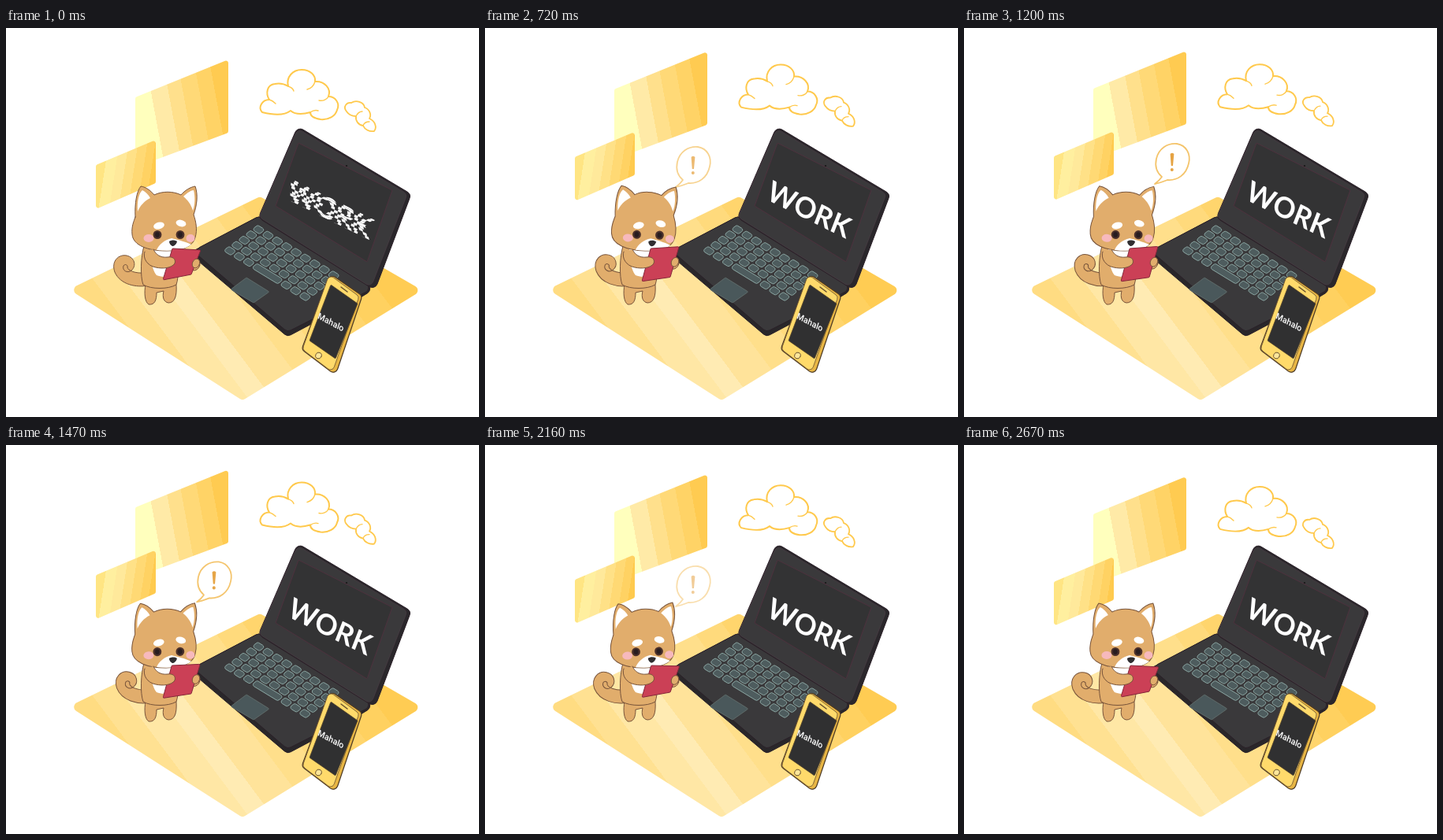
An HTML page with a canvas that plays this animation: 600 by 494 pixels, repeating every 2700 ms.

```html
<!DOCTYPE html>
<html lang="en">
<head>
<meta charset="utf-8">
<title>Work</title>
<style>
  html, body { margin: 0; width: 100%; height: 100%; overflow: hidden; background: #fff; }
  canvas { display: block; width: 600px; height: 494px; }
</style>
</head>
<body>
<canvas id="stage" width="600" height="494"></canvas>
<script>
const ctx = document.getElementById('stage').getContext('2d');
const LOOP = 2700, STEP = 30;
const INK = '#302e31', FUR = '#e1ad6c', LINE = '#77533a', GOLD = '#ffc94c';

// Piecewise linear value through [time, value] pairs.
function track(t, keys) {
  for (let i = 1; i < keys.length; i++) {
    const [t0, v0] = keys[i - 1], [t1, v1] = keys[i];
    if (t <= t1) return v0 + (v1 - v0) * (t - t0) / (t1 - t0);
  }
  return keys[keys.length - 1][1];
}

const noise = n => {
  const s = Math.sin(n * 127.1 + 11.7) * 43758.5453;
  return (s - Math.floor(s)) * 2 - 1;
};

function paint(path, fill, stroke, width = 1) {
  if (fill) { ctx.fillStyle = fill; ctx.fill(path); }
  if (stroke) { ctx.strokeStyle = stroke; ctx.lineWidth = width; ctx.stroke(path); }
}

const shape = (d, fill, stroke, width) => paint(new Path2D(d), fill, stroke, width);

function oval(x, y, rx, ry, fill, stroke, turn = 0, width = 1) {
  const p = new Path2D();
  p.ellipse(x, y, rx, ry, turn, 0, Math.PI * 2);
  paint(p, fill, stroke, width);
}

// Closed polygon with rounded corners.
function poly(points, radius = 0) {
  const p = new Path2D(), n = points.length;
  const [a, b] = [points[n - 1], points[0]];
  p.moveTo((a[0] + b[0]) / 2, (a[1] + b[1]) / 2);
  points.forEach((q, i) => {
    const next = points[(i + 1) % n];
    p.arcTo(q[0], q[1], next[0], next[1], radius);
  });
  p.closePath();
  return p;
}

function group(draw, dx = 0, dy = 0, turn = 0, px = 0, py = 0) {
  ctx.save();
  ctx.translate(px + dx, py + dy);
  ctx.rotate(turn);
  ctx.translate(-px, -py);
  draw();
  ctx.restore();
}

// Hard colour bands between two points; stops are [position, colour].
function bands(x0, y0, x1, y1, stops) {
  const g = ctx.createLinearGradient(x0, y0, x1, y1);
  stops.forEach(([at, color], i) => {
    g.addColorStop(at, color);
    g.addColorStop(i + 1 < stops.length ? stops[i + 1][0] : 1, color);
  });
  return g;
}

function drawFloor() {
  const fill = bands(84, 331, 366, 120, [
    [0, '#ffdc82'], [.08, '#ffe192'], [.17, '#ffe7a5'], [.27, '#ffebb3'],
    [.34, '#ffe39a'], [.46, '#ffdf8b'], [.57, '#ffda7c'], [.67, '#ffd56d'],
    [.77, '#ffd160'], [.88, '#ffcc53']
  ]);
  paint(poly([[80, 332], [322, 214], [528, 333], [300, 473]], 6), fill);
}

function drawPanels() {
  paint(poly([[164, 88], [282, 40], [282, 133], [164, 177]], 3), bands(165, 112, 284, 90, [
    [0, '#ffffbd'], [.2, '#ffeaa7'], [.38, '#ffe08c'], [.53, '#ffd977'],
    [.7, '#ffd366'], [.86, '#ffcb51']
  ]));
  paint(poly([[114, 174], [190, 142], [190, 197], [114, 230]], 3), bands(113, 192, 190, 204, [
    [0, '#ffe583'], [.13, '#ffef9f'], [.3, '#ffe99b'], [.45, '#ffe187'],
    [.6, '#ffd974'], [.75, '#ffd263'], [.88, '#ffca4e']
  ]));
}

function drawClouds() {
  ctx.lineCap = ctx.lineJoin = 'round';
  shape('M325 107C319 101 325 91 334 91C329 83 331 72 341 71C346 70 353 71 358 74' +
        'C355 62 364 53 375 53C386 53 393 60 392 68C404 67 413 77 409 87' +
        'C418 87 424 96 420 104C418 112 409 117 399 116C392 115 386 112 386 107' +
        'C376 110 367 110 361 105C352 112 337 110 325 107Z', '#fff', GOLD, 2);
  shape('M358 74C361 75 364 77 365 80M392 68C390 75 386 77 382 78' +
        'M409 87C407 91 402 93 397 92M386 107C389 105 393 104 396 105' +
        'M334 91C338 92 340 94 342 96', null, GOLD, 1.4);
  shape('M432 106C427 100 432 94 438 95C444 91 454 94 455 101C461 103 464 110 461 115' +
        'C468 118 471 126 467 131C461 132 455 129 453 124C447 123 443 118 444 112' +
        'C438 112 434 109 432 106Z', '#fff', GOLD, 1.8);
  shape('M444 112C446 108 449 106 452 106M453 124C454 121 457 119 461 119', null, GOLD, 1.3);
}

function drawBubble(alpha) {
  ctx.globalAlpha = alpha;
  shape('M251 189C244 183 242 175 244 166C247 153 258 146 270 147C282 149 288 160 285 172' +
        'C282 186 271 194 258 193C253 195 248 197 242 198C246 195 249 192 251 189Z',
        '#fff', '#f4c46b', 1.8);
  shape('M261.6 160Q264 157.5 266.4 160L265 175H262.8Z', '#e5a343');
  oval(263.8, 180, 2, 2.1, '#e5a343');
}

function drawKeys() {
  const at = (c, r) => [319 + c * 11.9 - r * 9.1, 249 + c * 7.25 + r * 6.75];
  const key = (c, r, w = 1) => paint(
    poly([at(c + .1, r + .1), at(c + w - .1, r + .1), at(c + w - .1, r + .9), at(c + .1, r + .9)], 2.6),
    '#4e5c5e', '#8ba6a2', 1);
  for (let r = 0; r < 5; r++) {
    for (let c = 0; c < 9; c++) {
      if (r < 4 || c < 3 || c > 5) key(c, r);
    }
  }
  key(3, 4, 3);
}

function drawLaptop() {
  const edge = '#2b2028';
  paint(poly([[236, 284], [321, 239], [468, 331], [440, 348], [357, 392], [238, 291]], 7), '#29272a', edge);
  paint(poly([[237, 283], [321, 239], [467, 330], [357, 386]], 7), '#3a393b', edge);
  drawKeys();
  paint(poly([[305, 317], [334, 335], [314, 349], [285, 332]], 1), '#4a585b', '#65716f', .8);
  paint(poly([[370, 125], [514, 211], [468, 333], [320, 241]], 7), '#2a272b', edge);
  paint(poly([[370, 128], [509, 211], [463, 329], [321, 240]], 6), '#3a393b', '#4b3d45', .7);
  paint(poly([[371, 146], [490, 206], [458, 297], [342, 226]], 1), '#333334', '#50313f', .9);
  oval(432, 175, 1.1, 1.1, '#171717');
}

function drawWord(t) {
  ctx.transform(.895, .445, -.36, .93, 355.5, 217);
  ctx.font = 'bold 36px Lato, sans-serif';
  ctx.textBaseline = 'alphabetic';
  const word = (x, color) => {
    ctx.fillStyle = color;
    ctx.fillText('WORK', x, 0);
  };
  if (t >= 600) return word(0, '#fff');

  const split = t >= 300, beat = Math.floor(t / 60);
  const reach = split ? 2.4 : 4.5;
  for (let y = -30, row = 0; y < 4; y += 3, row++) {
    const shift = noise(row * 3.1 + beat * 17) * reach;
    ctx.save();
    ctx.beginPath();
    ctx.rect(-20, y, 160, 3);
    ctx.clip();
    if (split) {
      ctx.globalCompositeOperation = 'lighter';
      word(shift - 1.5, '#f00');
      word(shift + 2.5, '#0f0');
      word(shift - 2.5 + noise(beat), '#00f');
    } else {
      word(shift, '#fff');
    }
    ctx.restore();
  }
}

function drawPhone() {
  paint(poly([[411, 312], [452, 340], [418, 441], [375, 408]], 6), '#e8b644', '#4c3924', 1.2);
  paint(poly([[410, 313], [448, 341], [414, 437], [376, 408]], 5), '#ffda6b', '#6a5130', .8);
  paint(poly([[412, 326], [446, 350], [418, 420], [385, 397]], 1), '#303031', '#54432b', .8);
  shape('M425 329L433 335', null, '#65502f', 1.5);
  oval(396.5, 416, 3.7, 4, '#ffe69a', '#65502f', .4);
  ctx.save();
  ctx.transform(.88, .47, -.32, .95, 412, 374);
  ctx.font = '500 11px Roboto, sans-serif';
  ctx.textAlign = 'center';
  ctx.textBaseline = 'middle';
  ctx.fillStyle = '#fff';
  ctx.fillText('Mahalo', 0, 0);
  ctx.restore();
}

function drawTail() {
  shape('M181 327C165 330 145 326 138 310C133 296 143 287 153 289C163 291 166 302 159 308' +
        'C154 312 147 308 149 302C151 299 155 301 154 304' +
        'C155 308 163 312 177 311Z', FUR, LINE);
}

function drawBody() {
  shape('M177 326C175 336 176 348 181 351C189 352 191 345 191 336L200 334' +
        'C198 342 200 348 206 349C214 349 217 341 216 326Z', FUR, LINE);
  shape('M175 277C171 290 170 315 174 326C184 332 206 332 216 326C220 315 219 292 212 277Z', FUR, LINE);
  shape('M183 278C184 295 185 307 191 314C201 318 212 315 214 306L216 278Z', '#fff');
}

function drawHead() {
  shape('M164 240C163 222 166 207 171 201C178 202 184 207 188 212C198 207 212 207 222 212' +
        'C227 206 234 202 240 201C244 212 242 226 238 237C241 246 243 256 240 266' +
        'C237 278 222 283 203 283C180 283 161 276 160 262C159 252 162 246 164 240Z', FUR, LINE);
  shape('M167 233C166 219 169 209 173 206C177 208 181 212 183 216C175 220 170 226 167 233Z' +
        'M237 232C235 224 230 218 225 214C230 209 235 206 238 206C240 214 240 224 237 232Z', '#fff');
  shape('M191 282C194 275 201 269 210 267C217 269 227 271 235 275C226 282 210 284 191 282Z', '#fff');
  oval(181, 267, 6.5, 5, '#f7b9bd');
  oval(234, 267, 5.5, 5, '#f7b9bd');
  oval(194, 251, 7, 4.3, '#fff', null, -.25);
  oval(222, 248, 6.5, 4.2, '#fff', null, .25);
  for (const x of [192, 221]) {
    oval(x, 262.5, 5.4, 5.6, '#4b302b');
    oval(x, 262.5, 3, 3.4, '#281d20');
  }
  shape('M207 271C210 269 214 269 217 271C216 275 213 277 211 277C209 276 207 274 207 271Z', INK);
}

function drawBook(p) {
  oval(239.5, 300 - p * 2, 6.5, 8, FUR, LINE, .3);
  paint(poly([[211 - p, 280], [247 - p, 282 - 5 * p], [235, 313 + 4 * p], [199, 320 + 2 * p]], 1),
        '#cb4056', '#85273a');
  shape('M176 284C173 292 179 302 190 304C199 306 210 305 214 299C216 293 211 290 205 291' +
        'C196 292 190 288 187 281', FUR, LINE);
  oval(241, 299 - p * 2, 4.5, 6, FUR, LINE, .4);
}

function render(t) {
  const lift = track(t, [[0, 0], [420, -7], [720, -10.3], [1020, -12], [1200, -11],
                         [1770, -6.3], [2160, -3], [2700, 0]]);
  const p = -lift / 12;
  ctx.globalAlpha = 1;
  ctx.fillStyle = '#fff';
  ctx.fillRect(0, 0, 600, 494);
  ctx.lineCap = ctx.lineJoin = 'round';

  drawFloor();
  group(drawPanels, 0, lift);
  group(drawClouds, 0, lift * .62);

  const fade = track(t, [[0, 0], [240, 0], [420, .42], [720, .75], [1200, 1],
                         [1770, .95], [2160, .55], [2640, 0], [2700, 0]]);
  const sink = track(t, [[0, 12], [420, 8], [720, 4], [1200, 0], [1770, 3], [2160, 7], [2700, 12]]);
  if (fade > 0) group(() => drawBubble(fade), 0, sink);

  drawLaptop();
  group(() => drawWord(t));
  drawPhone();
  group(drawTail, p * 3, 0, p * .05, 174, 318);
  drawBody();
  group(drawHead, 0, 0, .028 * Math.sin(t / LOOP * Math.PI * 2), 201, 280);
  drawBook(p);
}

const start = performance.now();
function tick() {
  const t = (performance.now() - start) % LOOP;
  render(Math.floor(t / STEP) * STEP);
  requestAnimationFrame(tick);
}
tick();
</script>
</body>
</html>
```
